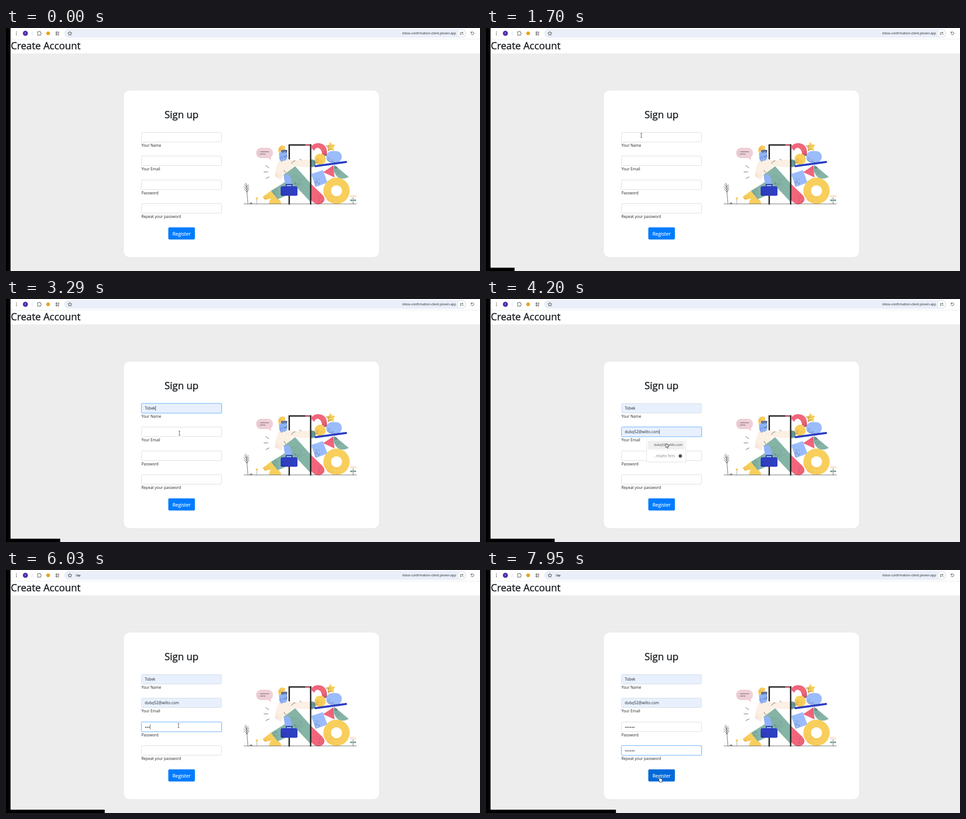
These frames come from a looping animation (1044 px wide and 536 px high, 8000 ms). An HTML page:

```html
<!DOCTYPE html>
<html lang="en">
<head>
<meta charset="utf-8">
<title>Sign up form</title>
<style>
  html, body { margin: 0; width: 100%; height: 100%; overflow: hidden; background: #fff; }
  svg { display: block; width: 100%; height: 100%; }
  text { font: 8.4px "Open Sans", "Noto Sans", sans-serif; fill: #212529; white-space: pre; }
  .heading { font-size: 21.7px; stroke: #212529; stroke-width: .55; }
  .small { font-size: 7px; fill: #444; }
  .hebrew { font: 7.6px "Liberation Sans", "DejaVu Sans", sans-serif; fill: #777; direction: rtl; }
  .line { fill: none; stroke: #333; stroke-width: .8; stroke-linecap: round; }
  .icon { fill: none; stroke: #474747; stroke-width: 1; }
</style>
</head>
<body>
<svg viewBox="0 0 1044 536">
  <!-- browser bar -->
  <rect width="1044" height="536" fill="#fff"/>
  <rect x="128" y="2" width="886" height="19.5" rx="9.75" fill="#e9eef8"/>
  <path d="M10 24.5H1044" stroke="#e8eaec"/>
  <path d="M23 8.6h.01M23 11.8h.01M23 15h.01" stroke="#444" stroke-width="1.8" stroke-linecap="round"/>
  <circle cx="42.7" cy="11.7" r="5.6" fill="#512da8"/>
  <text x="42.7" y="14" text-anchor="middle" style="font-size:6px;fill:#fff">T</text>
  <path d="M57.5 8v8" stroke="#c9d6ee"/>
  <path class="icon" d="M69.5 8.5h2.2a1.3 1.3 0 0 1 2.6 0h2.2v2.3a1.3 1.3 0 0 1 0 2.6v2.4h-7v-2.2a1.5 1.5 0 0 0 0-2.8z"/>
  <circle cx="92.8" cy="11.8" r="4" fill="#e9a21b"/>
  <path class="icon" d="M110 8.5h2.6v2.4H110zM110 13h2.6v2.4H110zM114.4 8.5h2v2.4h-2M114 13h3M114 15.5h3"/>
  <path class="icon" d="M140.7 7.4l1.3 2.9 3.1.3-2.4 2.1.7 3.1-2.7-1.6-2.7 1.6.7-3.1-2.4-2.1 3.1-.3z"/>
  <g id="key" class="icon"><circle cx="156.4" cy="11.9" r="2"/><path d="M158.5 11.2h4.7v1.6h-1.2v1.4h-1.6v-1.4h-1.8"/></g>
  <text x="991.3" y="14.3" text-anchor="end" style="font-size:6.9px">inbox-confirmation-client.ploven.app</text>
  <circle cx="1003.3" cy="11.7" r="7.4" fill="#fff"/>
  <path class="icon" d="M999.5 10h3.5M1004.5 13.6h3.2"/>
  <circle class="icon" cx="1005.3" cy="10" r="1.2"/><circle class="icon" cx="1001.4" cy="13.6" r="1.2"/>
  <path class="icon" d="M1024.7 9.8a3.2 3.2 0 1 1-.6 2.4M1024.2 7.8v2.6h2.6"/>

  <!-- page -->
  <text class="heading" x="10.6" y="47">Create Account</text>
  <rect x="10" y="56" width="1034" height="480" fill="#ededed"/>
  <rect x="258.5" y="137" width="564" height="369.5" rx="14" fill="#fff" stroke="#e3e3e3"/>
  <text class="heading" x="386.6" y="199" text-anchor="middle">Sign up</text>
  <g id="form"></g>
  <rect id="button" x="357.5" y="439.8" width="58.5" height="26.6" rx="2.4"/>
  <text x="386.7" y="457.6" text-anchor="middle" style="font-size:10.6px;fill:#fff;stroke:#fff;stroke-width:.2">Register</text>
  <g id="art"></g>

  <!-- suggestion popup, placed for the second field -->
  <g id="popup">
    <rect x="353" y="309.5" width="88" height="51" rx="3" fill="#000" opacity=".07"/>
    <rect x="354" y="309" width="86" height="50" rx="2.5" fill="#fff" stroke="#e4e4e4" stroke-width=".6"/>
    <rect id="hover" x="356.5" y="312.5" width="81" height="19" rx="1.5" fill="#efefef"/>
    <text id="choice" class="small" x="433" y="324.2" text-anchor="end"></text>
    <path d="M354.5 334H439.5" stroke="#eee" stroke-width=".7"/>
    <text class="hebrew" x="416" y="349">ניהול כתובות...</text>
    <circle cx="428" cy="346.2" r="3.8" fill="#555"/>
  </g>

  <g id="pointer">
    <path data-kind="beam" d="M-1.8-4.5h1.3l.5.5.5-.5h1.3M0-4V4M-1.8 4.5h1.3L0 4l.5.5h1.3" fill="none" stroke="#333" stroke-width=".9"/>
    <path data-kind="arrow" d="M0 0V9.4l2.2-2 1.5 3.4 1.5-.7L3.7 6.8h3z" fill="#fff" stroke="#222" stroke-width=".8"/>
    <path data-kind="hand" d="M-2.6 1V-5q0-1 1-1t1 1v3l4 .8q1 .3 .9 1.3L3.6 4V6h-5V4.4L-4.5.6q0-1.3 1.9.4z" fill="#fff" stroke="#222" stroke-width=".9"/>
  </g>
  <path d="M0 0H10V536H0z"/>
  <rect id="bar" y="528.7" height="7.3"/>
</svg>
<script>
const $ = id => document.getElementById(id);
const LOOP = 8000, START = 250, STEP = 68.75;

function add(parent, tag, attrs, text) {
  const el = document.createElementNS('http://www.w3.org/2000/svg', tag);
  for (const name in attrs) el.setAttribute(name, attrs[name]);
  if (text) el.textContent = text;
  return parent.appendChild(el);
}

// ---- Illustration ----
const art = $('art'), defs = add(art, 'defs', {});
let seed = 7;
const random = () => (seed = (seed * 16807) % 2147483647) / 2147483647;

// A flat shape, with optional speckles that thin out from (x, y).
function shape(fill, d, grain) {
  add(art, 'path', { d, fill, 'fill-rule': 'evenodd' });
  if (!grain) return;
  const [x, y, radius, count, color = '#333a4d'] = grain;
  const id = 'clip' + defs.childElementCount;
  add(add(defs, 'clipPath', { id }), 'path', { d, 'clip-rule': 'evenodd' });
  let dots = '';
  for (let i = 0; i < count; i++) {
    const angle = random() * 2 * Math.PI, r = radius * random();
    dots += `M${(x + r * Math.cos(angle)).toFixed(1)} ${(y + r * Math.sin(angle)).toFixed(1)}h.8`;
  }
  add(art, 'path', { d: dots, stroke: color, 'stroke-width': .8, opacity: .7, 'clip-path': `url(#${id})` });
}
const line = (d, attrs) => add(art, 'path', { d, class: 'line', ...attrs });
const disc = (x, y, r) => `M${x - r} ${y}a${r} ${r} 0 1 0 ${2 * r} 0a${r} ${r} 0 1 0 ${-2 * r} 0z`;
const star = (x, y, outer, inner, turn) => 'M' + Array.from({ length: 10 }, (_, i) => {
  const r = i % 2 ? inner : outer, a = turn + i * Math.PI / 5;
  return `${(x + r * Math.sin(a)).toFixed(1)} ${(y - r * Math.cos(a)).toFixed(1)}`;
}).join('L') + 'z';

const RED = '#f2667b', YELLOW = '#f8cf5c', BLUE = '#9bbcfb', GREEN = '#85b4a6', NAVY = '#2e3fc2', CREAM = '#fcefe3';

// Plants, bubble, motion marks
line('M533 388L529 344M531 362L524.5 355M531 362L535 354M530.5 357L524 350M530.5 357L534.5 349M530 352L525 345M530 352L533.5 345M529 344L527.5 342');
line('M537 388l1.5-3 1 3 1.5-3 1 3');
line('M552.5 388V378', { style: 'stroke:#888' });
shape(YELLOW, disc(552.5, 376, 2.5));
line('M764.5 388V374');
shape('#f8e6dc', 'M757 371q0-2.5 3-2.5h9q3 0 3 2.5t-3 2.5h-9q-3 0-3-2.5z');
shape('#6f9e93', 'M764.5 380q-5-4-7 0 2 4 7 0q5-4 7 0-2 4-7 0z');
shape('#efd0d8', 'M562.5 264h13.5a11.7 11.7 0 0 1 7.5 21l0 7-5-5h-16a11.5 11.5 0 0 1 0-23z', [556, 280, 16, 130, '#d9afba']);
line('M560 273H579M560 278H571');
line('M572 303L579 308.5M568 317.5H577M572.5 332L580 328.5');

// Door frame, then the walking figure
line('M623.8 388V258H671', { style: 'stroke:#1f2222;stroke-width:3;stroke-linecap:square' });
line('M660 258H671', { style: 'stroke:#d95a69;stroke-width:2.4' });
shape(YELLOW, 'M565 373L586 357 599 377Q606 381 606 388H579Q580 380 584 376L571 379z', [570, 377, 12, 80, '#d99a2c']);
shape(GREEN, 'M614 340L584 359 598 378 626 366 640 351z', [588, 365, 13, 100, '#3d6d62']);
shape(GREEN, 'M610 321L637 305 671 343V384L640 351 618 341z', [636, 342, 20, 120, '#3d6d62']);
shape(RED, 'M671 343L697 368Q704 376 700 383 690 393 679 386L671 379z', [700, 386, 22, 200, '#a33a5c']);
shape(CREAM, 'M602 291Q610 287 620 288 632 294 646 291L674 290V306Q650 308 626 304L632 309 611 324 606 335 592 327Q594 306 602 291z', [595, 325, 12, 45, '#d5aa95']);
line('M629 299Q633 292 637 293M647 289L650 291M612 314L616 319');
shape('#689e9a', 'M672 290Q681 289 682 298 681 307 672 307z', [681, 300, 10, 110]);
shape('#8fb2f7', 'M601 270Q610 264 619 270L620 284Q619 293 611 293L606 295 602 288z', [603, 289, 8, 50, '#476bc2']);
shape(YELLOW, 'M601 276Q598 268 602 263 606 257 612 260 617 261 614 267 609 269 606 271L604 276z', [602, 267, 6, 40, '#e28b3f']);
line('M606 271H619M608 270h4v4h-4zM614 269.5h4.5v4h-4.5M612 284Q616 285 618 281', { style: 'stroke-width:.9' });
shape('#8fb2f7', 'M612 330Q612 322 619 322 625 323 627 331L630 343 627 349H616z');
line('M617 350V345H630V350', { style: 'stroke:#25349b;stroke-width:2' });
shape(NAVY, 'M609 349H638Q641 349 642 353V367Q642 370 639 370H608Q605 370 605 367V353Q605 349 609 349z', [609, 368, 12, 80, '#182064']);
line('M671 258V388', { style: 'stroke:#1f2222;stroke-width:3' });

// Pile of blocks
shape(RED, 'M671 263Q678 253 689 254 707 256 707 275V282L696 282Q697 267 687 264 681 264 679 271z', [702, 283, 15, 200]);
shape(YELLOW, star(715, 262.5, 11.3, 6.3, -.1), [705, 266, 11, 130]);
shape(YELLOW, disc(692, 289.5, 12.3), [683, 298, 14, 140, '#c9702e']);
shape(BLUE, 'M717 271.5H728A12.8 12.8 0 0 1 728 297H717A12.8 12.8 0 0 1 717 271.5z', [709, 299, 14, 220]);
line('M681.5 304.8L749 295.5', { style: `stroke:${NAVY};stroke-width:4.4` });
shape(RED, 'M698.5 318L721 303 723.5 329.5z', [721, 304, 14, 120, '#823355']);
shape(GREEN, 'M723 302L755 328.5Q743 335 732 330 719 320 723 302z', [727, 306, 16, 200]);
shape(BLUE, 'M672 322L698 313.5 708 341 682 350.5z', [677, 349, 20, 260]);
shape(YELLOW, disc(728, 359, 29) + disc(728, 359, 12), [707, 381, 27, 260, '#e0953c']);
line('M524 388H772');

// ---- Form ----
const PITCH = 52.33, NAME = 'Tobek', EMAIL = 'dubq52@wilto.com';
const fields = ['Your Name', 'Your Email', 'Password', 'Repeat your password'].map((label, i) => {
  const y = 230.5 + Math.round(PITCH * i);
  add($('form'), 'text', { x: 298.2, y: y + 31.3 }, label);
  return {
    y,
    glow: add($('form'), 'rect', { x: 297.2, y: y - 1.3, width: 179, height: 23.6, rx: 3, fill: '#bfdeff' }),
    box: add($('form'), 'rect', { x: 298.5, y, width: 176, height: 21, rx: 2 }),
    value: add($('form'), 'text', { x: 305.7, y: y + (i > 1 ? 14.2 : 13.4), style: i > 1 ? 'font-size:9.8px' : '' }),
  };
});
const caret = add($('form'), 'rect', { width: .8, height: 10.5, fill: '#222' });

const focusTimes = [2000, 3440, 4950, 6690];
const inputTimes = [
  [2800], [4000],
  [5520, 5800, 5970, 6120, 6260, 6400],
  [6900, 6970, 7040, 7110, 7170, 7260],
];
const popups = [[2070, 2930], [3570, 4410]];

// time, x, y, cursor shown from that time on
const path = [
  [250, 993, 330, 'arrow'], [650, 740, 262, 'arrow'], [1030, 432, 215, 'arrow'], [1350, 350, 232, 'beam'],
  [1550, 342, 237, 'beam'], [2300, 342, 237, 'beam'], [2780, 388, 267, 'arrow'], [2930, 390, 268, 'arrow'],
  [3150, 382, 296, 'beam'], [3640, 382, 296, 'beam'], [3980, 396, 318.5, 'arrow'], [4420, 396, 318.5, 'arrow'],
  [4720, 380, 343, 'beam'], [6450, 380, 343, 'beam'], [6650, 368, 398, 'beam'], [7690, 368, 398, 'beam'],
  [7830, 380, 443, 'hand'], [7920, 384, 462, 'hand'], [8000, 384, 462, 'hand'],
];
const countUntil = (times, t) => times.filter(time => time <= t).length;
const show = (el, on) => el.setAttribute('visibility', on ? 'visible' : 'hidden');

function drawPointer(t) {
  const visible = t > START;
  const i = Math.max(0, countUntil(path.map(p => p[0]), t) - 1);
  const [t0, x0, y0, kind] = path[i], [t1, x1, y1] = path[i + 1] || path[i];
  const k = t1 > t0 ? Math.min(1, Math.max(0, (t - t0) / (t1 - t0))) : 0;
  $('pointer').setAttribute('transform', `translate(${x0 + (x1 - x0) * k} ${y0 + (y1 - y0) * k})`);
  for (const el of $('pointer').children) show(el, visible && el.dataset.kind === kind);
}

function draw(time) {
  const t = time < START ? 0 : START + STEP * Math.floor((time - START) / STEP + .001);
  const focused = countUntil(focusTimes, t) - 1;

  fields.forEach((field, i) => {
    const count = countUntil(inputTimes[i], t), active = i === focused;
    show(field.glow, active);
    field.box.setAttribute('fill', i < 2 && count ? '#e8f0fe' : '#fff');
    field.box.setAttribute('stroke', active ? '#80bdff' : '#d6dbdf');
    field.value.textContent = i > 1 ? '•'.repeat(count) : count ? [NAME, EMAIL][i] : '';
  });

  // The caret restarts its blink at every focus or key press.
  const field = fields[focused];
  if (field) {
    const since = Math.max(...[focusTimes, ...inputTimes].flat().filter(time => time <= t));
    const width = field.value.textContent ? field.value.getComputedTextLength() : 0;
    caret.setAttribute('x', 305.9 + width);
    caret.setAttribute('y', field.y + 5.2);
    show(caret, (t - since) % 1060 < 530);
  } else show(caret, false);

  const open = popups.findIndex(([from, to]) => t >= from && t < to);
  $('popup').style.display = open < 0 ? 'none' : '';
  if (open >= 0) {
    $('popup').setAttribute('transform', `translate(0 ${(open - 1) * PITCH})`);
    $('choice').textContent = [NAME, EMAIL][open];
    show($('hover'), t >= inputTimes[open][0]);
  }

  show($('key'), t >= inputTimes[2][0]);
  $('button').setAttribute('fill', t >= 7830 ? '#0069d9' : '#007bff');
  $('bar').setAttribute('width', t ? 2.4 + .0357 * t : 0);
  drawPointer(t);
}

const origin = performance.now();
function tick() {
  draw((performance.now() - origin) % LOOP);
  requestAnimationFrame(tick);
}
tick();
</script>
</body>
</html>
```
